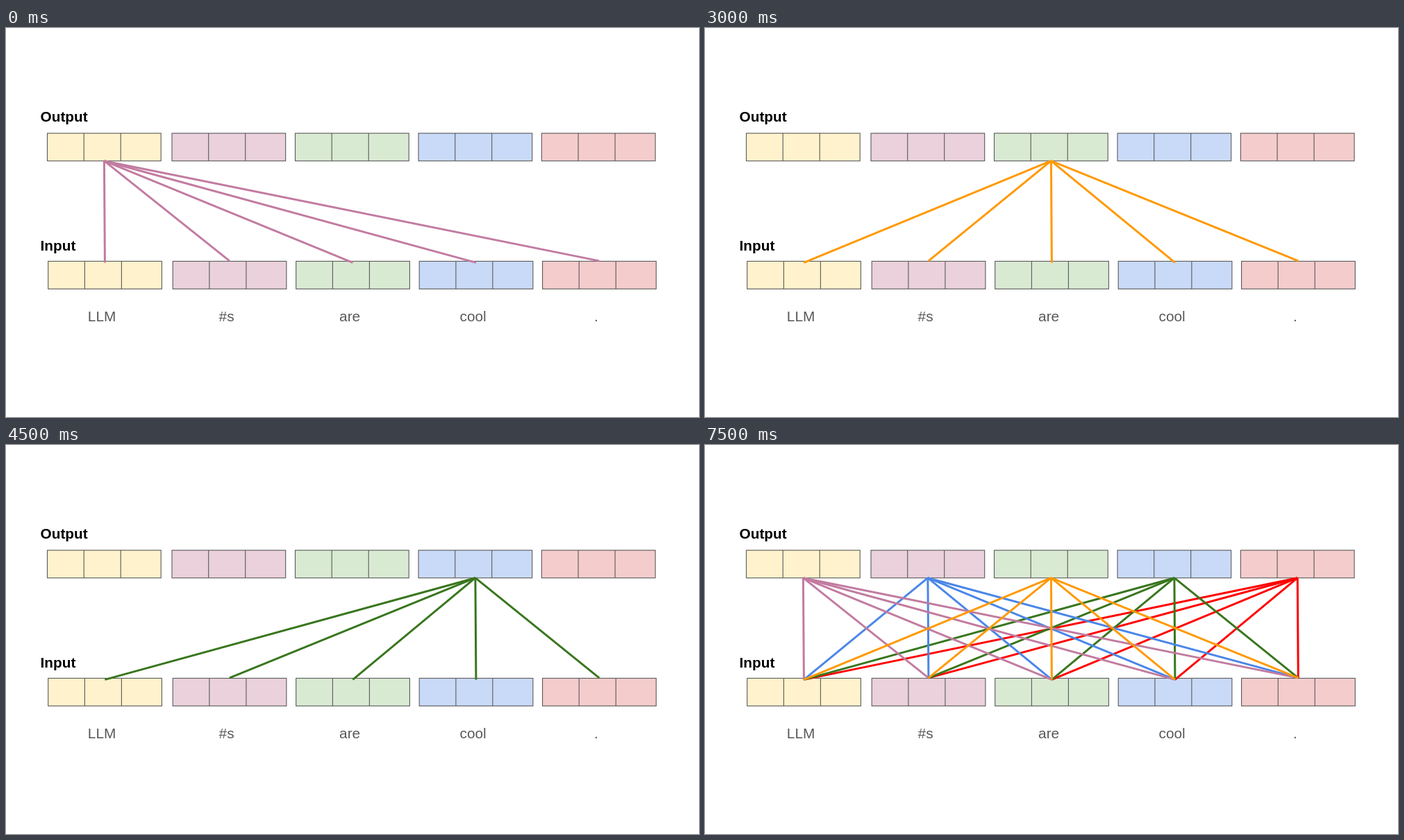
Write an HTML page with a canvas that moves like this. It is 998 by 561 pixels and loops after 9 s.

```html
<!DOCTYPE html>
<html lang="en">
<head>
<meta charset="utf-8">
<title>Attention links</title>
<style>
  html, body { margin: 0; width: 100%; height: 100%; overflow: hidden; background: #fff; }
  canvas { display: block; width: 998px; height: 561px; }
</style>
</head>
<body>
<canvas id="stage" width="998" height="561"></canvas>
<script>
const ctx = document.getElementById('stage').getContext('2d');
const STEP = 1500;
const CELL = 53;
const WIDTH = 163.7;
const OUT_Y = 151.8;
const IN_Y = 336.4;
const HEIGHT = 39.9;

// x: left edge, dip: how far links reach past the input row's top edge
const TOKENS = [
  { word: 'LLM', x: 59.5, fill: '#fff2cc', link: '#c27ba0', dip: 2 },
  { word: '#s', x: 239, fill: '#ead1dc', link: '#4a86e8', dip: -0.5 },
  { word: 'are', x: 416.5, fill: '#d9ead3', link: '#ff9900', dip: 2 },
  { word: 'cool', x: 594, fill: '#c9daf8', link: '#38761d', dip: 2 },
  { word: '.', x: 771.4, fill: '#f4cccc', link: '#ff0000', dip: -0.5 }
];
const [PURPLE, BLUE, ORANGE, GREEN, RED] = TOKENS;
const STACK = [RED, GREEN, BLUE, PURPLE, ORANGE];

function line(x1, y1, x2, y2) {
  ctx.beginPath();
  ctx.moveTo(x1, y1);
  ctx.lineTo(x2, y2);
  ctx.stroke();
}

function block(x, y, fill) {
  ctx.fillStyle = fill;
  ctx.fillRect(x, y, WIDTH, HEIGHT);
  ctx.strokeStyle = '#595959';
  ctx.lineWidth = 1.1;
  ctx.strokeRect(x, y, WIDTH, HEIGHT);
  for (const n of [1, 2]) {
    const cx = x + n * CELL - 0.3;
    line(cx, y, cx, y + HEIGHT);
  }
}

function label(text, x, y, color, weight, align) {
  ctx.font = `${weight} 20.8px "Liberation Sans", Arial, sans-serif`;
  ctx.fillStyle = color;
  ctx.textAlign = align;
  ctx.fillText(text, x, y);
}

// Links from one output block to every input block
function fan(from) {
  ctx.strokeStyle = from.link;
  ctx.lineWidth = 3;
  for (const to of TOKENS) {
    line(from.x + 81.9, OUT_Y + HEIGHT, to.x + 82.9, IN_Y + to.dip);
  }
}

function draw(ms) {
  const phase = Math.floor(ms / STEP) % (TOKENS.length + 1);
  ctx.fillStyle = '#fff';
  ctx.fillRect(0, 0, 998, 561);
  label('Output', 49.5, 135.2, '#000', 'bold', 'left');
  label('Input', 49.5, 320.8, '#000', 'bold', 'left');
  for (const { word, x, fill } of TOKENS) {
    block(x, OUT_Y, fill);
    block(x + 1.2, IN_Y, fill);
    label(word, x + 78.6, 423.4, '#595959', 'normal', 'center');
  }
  const shown = phase < TOKENS.length ? [TOKENS[phase]] : STACK;
  shown.forEach(fan);
}

const start = performance.now();
function tick() {
  draw(performance.now() - start);
  requestAnimationFrame(tick);
}
tick();
</script>
</body>
</html>
```
